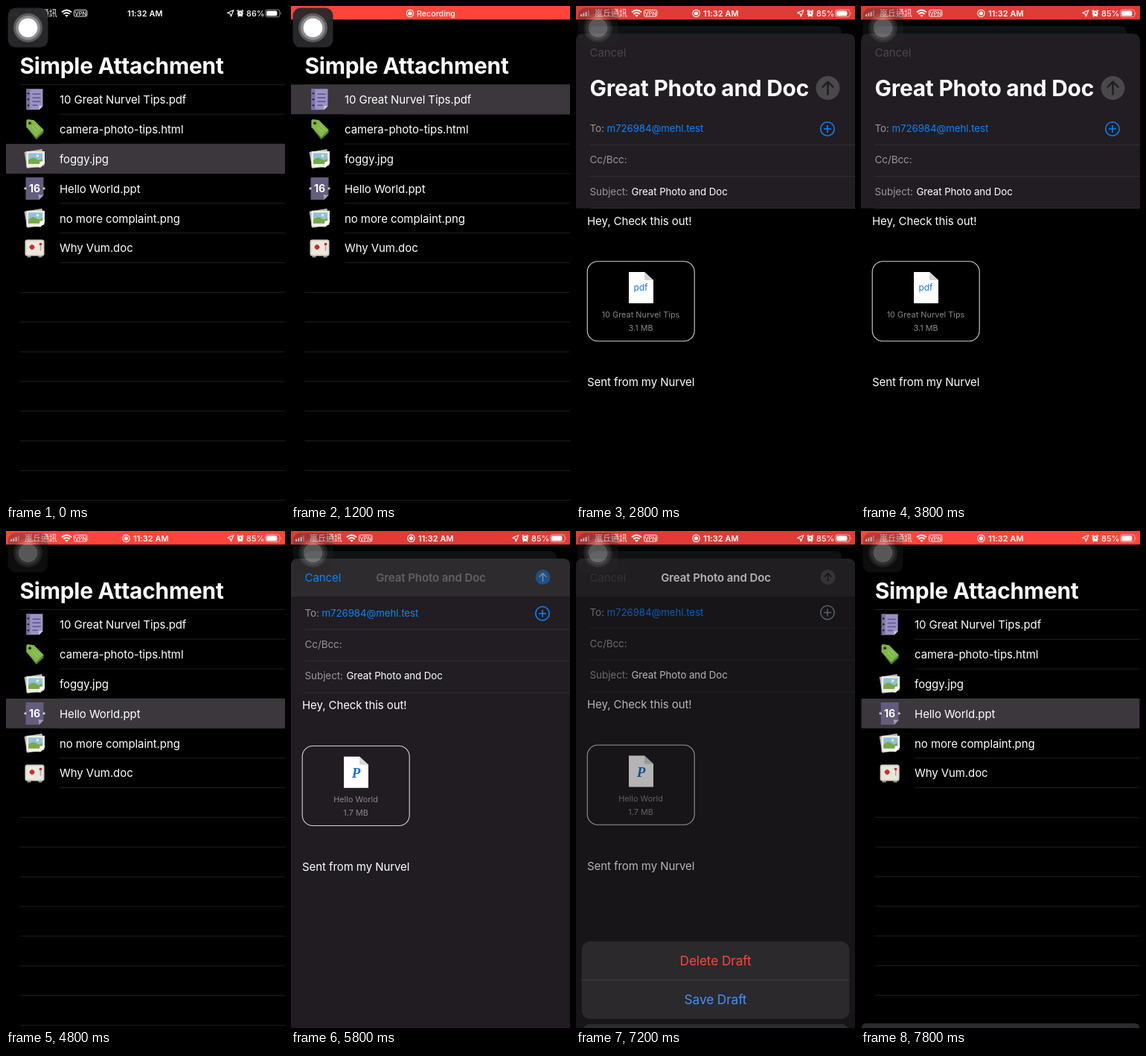
An HTML page for the animation above (8000 ms loop, 375 px wide and 667 px high).

```html
<!DOCTYPE html>
<html lang="en">
<head>
<meta charset="utf-8">
<title>Mail attachment demo</title>
<style>
html, body { margin: 0; width: 100%; height: 100%; overflow: hidden; background: #000; }
svg { display: block; width: 100vw; height: 100vh; }
text { font-family: Inter, "Noto Sans CJK TC", "Noto Sans CJK", sans-serif; font-size: 15px; letter-spacing: -.08px; fill: #fff; font-optical-sizing: none; white-space: pre; }
.big { font-size: 29.9px; font-weight: 700; letter-spacing: -.24px; }
.field { font-size: 13.3px; }
.label { fill: #98949a; font-size: 13.5px; }
.tiny { font-size: 10.8px; letter-spacing: .05px; fill: #8b888c; text-anchor: middle; }
.status { font-size: 10.9px; font-weight: 500; letter-spacing: .05px; }
.action { font-size: 17.3px; letter-spacing: -.12px; text-anchor: middle; }
.line { stroke: #39353a; stroke-width: .8; }
</style>
</head>
<body>
<svg id="stage" viewBox="0 0 375 667" preserveAspectRatio="none"></svg>
<script>
const LOOP = 8000, ROW = 39.85, LIST_TOP = 105.4, REST = 37, TRAVEL = 630, SCROLL = 55.5;
const BLUE = '#0a84ff';

const files = [
  ['note', '10 Great Nurvel Tips.pdf'],
  ['tag', 'camera-photo-tips.html'],
  ['photo', 'foggy.jpg'],
  ['date', 'Hello World.ppt'],
  ['photo', 'no more complaint.png'],
  ['safe', 'Why Vum.doc']
];

// Icons are drawn around their own centre
const icons = {
  note: `<path d="M-11-14H11V9L6 14H-11Z" fill="#9b92c5"/><path d="M-11-14h5V14h-5Z" fill="#7c73a8"/>
    <path d="M11 9H6V14Z" fill="#d5d0ea"/><path d="M-3-7H8M-3-2H8M-3 3H8M-3 8H4" stroke="#5d5487" stroke-width="1.5"/>
    <g fill="#2c2740"><circle cx="-8.5" cy="-8" r="1.4"/><circle cx="-8.5" r="1.4"/><circle cx="-8.5" cy="8" r="1.4"/></g>`,
  tag: `<path d="M-11-11Q-11-13-9-13L-1-12L12 1V5L2 14L-11-3Z" fill="#527f2b"/>
    <path d="M-11-11Q-11-13-9-13L-1-12L12 1L2 11L-11-3Z" fill="#83b64b"/>
    <circle cx="-6.5" cy="-8" r="2" fill="#26380f"/><path d="M-3-3L4 4M0-6L7 1" stroke="#9cca66" stroke-width="1.2"/>`,
  photo: `<path d="M-14-9L10-13L13 9L-10 13Z" fill="#b9b8b1"/><path d="M-11-10H13.5V6L8 11.5H-11Z" fill="#efeee6"/>
    <path d="M-8.5-7.5H10.5V7H-8.5Z" fill="#8fc3dc"/><path d="M-8.5 2Q-3-4 2 0T10.5-1V7H-8.5Z" fill="#79a846"/>
    <circle cx="4" cy="-4" r="1.8" fill="#f2eebb"/><path d="M13.5 3V6L8 11.5H6L7 4Z" fill="#fff"/>`,
  date: `<path d="M-12-15H12V9L6 15H-12Z" fill="#655d7c"/><path d="M12 9L6 15L5 8Z" fill="#a59dbb"/>
    <path d="M-12 0H12" stroke="#4c455f"/><path d="M-14 0H-11M11 0H14" stroke="#cfcbd8" stroke-width="2.6"/>
    <text y="5" text-anchor="middle" style="font-size:14px;font-weight:700;letter-spacing:0">16</text>`,
  safe: `<path d="M-10 9h5v4h-5zM5 9h5v4H5z" fill="#8f8a80"/><rect x="-13" y="-11" width="26" height="22" rx="3" fill="#d8d3c7"/>
    <rect x="-11" y="-9" width="22" height="18" rx="2" fill="#ece8de"/><circle cx="-3.5" cy="-1" r="3.1" fill="#c62f2b"/>
    <path d="M-3.5-5V3M-7.5-1H.5M-6-3.5L-1 1.5M-1-3.5L-6 1.5" stroke="#c62f2b" stroke-width=".8"/>
    <circle cx="8" cy="-5" r="1.9" fill="#c62f2b"/><path d="M8-3V4" stroke="#a8a297" stroke-width="1.4"/>`
};

const text = (x, y, s, cls = '', more = '') => `<text x="${x}" y="${y}" class="${cls}" ${more}>${s}</text>`;
const line = (x, y, more = '') => `<path d="M${x} ${y}H375" class="line" ${more}/>`;
const send = (id, y, r) => `<g id="${id}" transform="translate(338.5 ${y}) scale(${r / 16})">
  <circle r="16" stroke="none"/><path d="M0 8.5V-8M-7-1.3L0-8.3L7-1.3" fill="none" stroke-width="2.5" stroke-linecap="round" stroke-linejoin="round"/></g>`;

function listView() {
  const rows = files.map(([icon, name], i) => {
    const y = LIST_TOP + ROW * (i + .5);
    return `<g transform="translate(38.5 ${y})">${icons[icon]}</g>` + text(72, y + 5.8, name);
  }).join('');
  const lines = Array.from({ length: 15 }, (_, i) =>
    line(i > 0 && i < 7 ? 72 : 18.5, LIST_TOP + ROW * i, 'style="stroke:#29272a"')).join('');
  return `<g id="list" clip-path="url(#card)"><rect width="375" height="667"/>${lines}
    <rect id="pick" width="375" height="${ROW}" fill="#3b373d"/>${text(18.5, 91, 'Simple Attachment', 'big')}${rows}
    <rect id="shade" width="375" height="667" fill="#101516"/></g>`;
}

function sheetView() {
  return `<g id="sheet" clip-path="url(#card)">
    <rect id="paper" width="375" height="667"/>
    <g id="scroll">
      <rect width="375" height="234.5" fill="#211d22"/>
      ${text(18.5, 84, 'Great Photo and Doc', 'big')}${send('sendBig', 73, 16)}
      ${text(18.5, 132, 'To:', 'label')}${text(41.5, 132, 'm726984@mehl.test', 'field', `style="fill:${BLUE}"`)}
      <g id="plus" fill="none" stroke-width="1.5"><circle cx="338" cy="128" r="9.2"/><path d="M333 128h10M338 123v10"/></g>
      ${line(18.5, 149.3)}${text(18.5, 174.2, 'Cc/Bcc:', 'label')}${line(18.5, 191.6)}
      ${text(18.5, 216.7, 'Subject:', 'label')}${text(74.5, 216.7, 'Great Photo and Doc', 'field')}${line(18.5, 234.3)}
      ${text(15, 256.6, 'Hey, Check this out!')}
      <rect x="15.2" y="305.7" width="144" height="107" rx="14" fill="none" stroke="#d4d2d5" stroke-width="1.1"/>
      <path d="M71 320H92L104 331V362H71Z" fill="#fff"/><path d="M92 320V331H104Z" fill="#d6d6d8"/>
      ${text(87, 345, 'pdf', '', 'id="pdf" text-anchor="middle" style="fill:#1b78d8;font-size:12px"')}
      ${text(87.5, 348, 'P', '', 'id="ppt" text-anchor="middle" style="fill:#1b6fd0;font:italic 700 19px \'Liberation Serif\',serif"')}
      ${text(87, 381, '', 'tiny', 'id="fileName"')}${text(87, 399.3, '', 'tiny', 'id="fileSize"')}
      ${text(15, 473.2, 'Sent from my Nurvel')}
    </g>
    <rect id="bar" width="375" height="51" fill="#2d2b2e"/>
    ${text(18.5, 30.6, 'Cancel', '', 'id="cancel"')}
    ${text(188, 30.5, 'Great Photo and Doc', '', 'id="smallTitle" text-anchor="middle" style="font-weight:600"')}
    ${send('sendSmall', 25, 10)}
    <rect id="dim" width="375" height="667"/>
  </g>`;
}

function actionView() {
  return `<g id="action"><rect x="7.5" width="360" height="104" rx="11.5" fill="#2b292c"/>
    <path d="M7.5 52H367.5" stroke="#464347" stroke-width=".8"/>
    ${text(187.5, 32.5, 'Delete Draft', 'action', 'style="fill:#ff453a"')}${text(187.5, 84.5, 'Save Draft', 'action', 'style="fill:#3f93ff"')}
    <rect x="7.5" y="111" width="360" height="52" rx="11.5" fill="#2d2b2e"/>
    ${text(187.5, 143.5, 'Cancel', 'action', 'style="fill:#3f93ff;font-weight:600"')}</g>`;
}

function statusView() {
  const dot = x => `<circle cx="${x}" cy="9.8" r="4.7" fill="none" stroke="#fff" stroke-width="1.1"/><circle cx="${x}" cy="9.8" r="2.6" fill="#fff"/>`;
  return `<rect id="red" width="375" height="18.2"/>
    <g id="info">
      <path d="M6 14v-3h2v3zM9.3 14V9.5h2V14zM12.6 14V8h2v6z" fill="#fff"/><path d="M15.9 14V6h2v8z" fill="#fff" opacity=".4"/>
      ${text(25, 13.7, '嵐丘通訊', 'status', 'style="font-weight:400"')}
      <g fill="none" stroke="#fff" stroke-width="1.9"><path d="M75 8.2Q81.5 2.6 88 8.2M77.3 10.8Q81.5 7.2 85.7 10.8"/></g>
      <path d="M79.2 12.6Q81.5 10.8 83.8 12.6L81.5 14.8Z" fill="#fff"/>
      <rect x="91.5" y="5.4" width="17.4" height="8.6" rx="2" fill="none" stroke="#fff" stroke-width=".9"/>
      ${text(100.2, 12.5, 'VPN', '', 'text-anchor="middle" style="font-size:7.4px;font-weight:500;letter-spacing:0"')}
      <g id="clockDot">${dot(161.5)}</g>${text(0, 13.8, '11:32 AM', 'status', 'id="clock" style="font-weight:600"')}
      <path d="M306 5.5L302.3 14L301.4 10.2L297.5 9.2Z" fill="none" stroke="#fff" stroke-width="1.1" stroke-linejoin="round"/>
      <circle cx="314.8" cy="10" r="3.8" fill="#fff"/><path d="M310.6 7.2L312.6 5.3M319 7.2L317 5.3M312 14.3l1-1.2M317.6 14.3l-1-1.2" stroke="#fff" stroke-width="1.4"/>
      <path d="M314.8 7.8V10.2H316.6" fill="none" stroke="#333" stroke-width=".8"/>
      ${text(323, 13.8, '', 'status', 'id="charge"')}
      <rect x="348.6" y="5" width="19.4" height="9.6" rx="2.8" fill="none" stroke="#fff" stroke-opacity=".6" stroke-width=".9"/>
      <rect x="350" y="6.4" width="14.4" height="6.8" rx="1.6" fill="#fff"/><path d="M369.2 8.2q1.6 1.6 0 3.2z" fill="#fff" opacity=".6"/>
    </g>
    <g id="recording">${dot(160)}${text(169, 13.6, 'Recording', 'status', 'style="font-size:10.6px"')}</g>`;
}

document.getElementById('stage').innerHTML = `
  <defs><clipPath id="card"><path d="M0 667V10Q0 0 10 0H365Q375 0 375 10V667Z"/></clipPath></defs>
  <rect width="375" height="667"/>
  ${listView()}${sheetView()}${actionView()}${statusView()}
  <g id="touch"><rect x="2.5" y="2.5" width="54" height="53" rx="10.5" fill="#29282a" fill-opacity=".96"/>
    <circle cx="29.5" cy="29.3" r="19.5" fill="#5d5b5d"/><circle cx="29.5" cy="29.3" r="16.3" fill="#908e90"/>
    <circle cx="29.5" cy="29.3" r="12.8" fill="#fff"/></g>`;

const el = {};
document.querySelectorAll('[id]').forEach(n => el[n.id] = n);
const set = (id, attrs) => { for (const k in attrs) el[id].setAttribute(k, attrs[k]); };
const show = (id, on) => set(id, { opacity: +on });
const clamp = v => Math.max(0, Math.min(1, v));
const ramp = (t, start, dur) => clamp((t - start) / dur);
const out = (t, start, dur) => 1 - (1 - ramp(t, start, dur)) ** 4;
const mix = (a, b, p) => `rgb(${a.map((v, i) => Math.round(v + (b[i] - v) * p))})`;

function paintSend(id, off) {
  set(id, { fill: off ? '#4b484c' : BLUE, stroke: off ? '#211d22' : '#fff' });
}

function draw(t) {
  const second = t > 4650;
  const [open, close, ask, answer] = second ? [4850, 7460, 6500, 7165] : [1250, 3860, 2800, 3400];
  const up = out(t, open, 500) - out(t, close, 500);
  const asking = out(t, ask, 400) - out(t, answer, 400);
  const off = t > ask;

  // List behind the sheet
  const picked = t < 1050 ? 2 : second ? 3 : 0;
  set('pick', { y: LIST_TOP + ROW * picked });
  set('list', { transform: `translate(${18 * up} ${27 * up}) scale(${1 - .096 * up})` });
  show('shade', up * .9);

  // Mail sheet
  const scrolled = second ? out(t, 5525, 450) : 0;
  set('sheet', { transform: `translate(0 ${REST + TRAVEL * (1 - up)})`, visibility: up > 0 ? 'visible' : 'hidden' });
  set('scroll', { transform: `translate(0 ${-SCROLL * scrolled})` });
  set('paper', { fill: mix([0, 0, 0], [33, 29, 34], scrolled) });
  set('bar', { fill: mix([33, 29, 34], [45, 43, 46], scrolled), opacity: +(scrolled > 0) });
  show('smallTitle', second ? ramp(t, 5720, 330) : 0);
  show('sendSmall', second ? ramp(t, 5640, 380) : 0);
  paintSend('sendBig', off);
  paintSend('sendSmall', off);
  el.cancel.style.fill = off ? '#4a474b' : BLUE;
  set('plus', { stroke: mix([10, 132, 255], [130, 136, 144], clamp(asking * 1.4)) });
  show('pdf', !second);
  show('ppt', second);
  el.fileName.textContent = second ? 'Hello World' : '10 Great Nurvel Tips';
  el.fileSize.textContent = second ? '1.7 MB' : '3.1 MB';
  show('dim', .43 * asking);
  set('action', { transform: `translate(0 ${671.5 - 176 * asking})`, visibility: asking > 0 ? 'visible' : 'hidden' });

  // Status bar and floating button
  const live = t >= 400, label = live && t < 2600;
  set('red', { fill: mix([255, 69, 58], [224, 60, 54], label ? 0 : up), opacity: +live });
  show('info', !label);
  show('recording', label);
  show('clockDot', live);
  set('clock', { x: live ? 171 : 163 });
  el.charge.textContent = live ? '85%' : '86%';
  show('touch', 1 - .66 * ramp(t, 2400, 300));
}

function tick(now) {
  draw(now % LOOP);
  requestAnimationFrame(tick);
}
draw(0);
requestAnimationFrame(tick);
</script>
</body>
</html>
```
